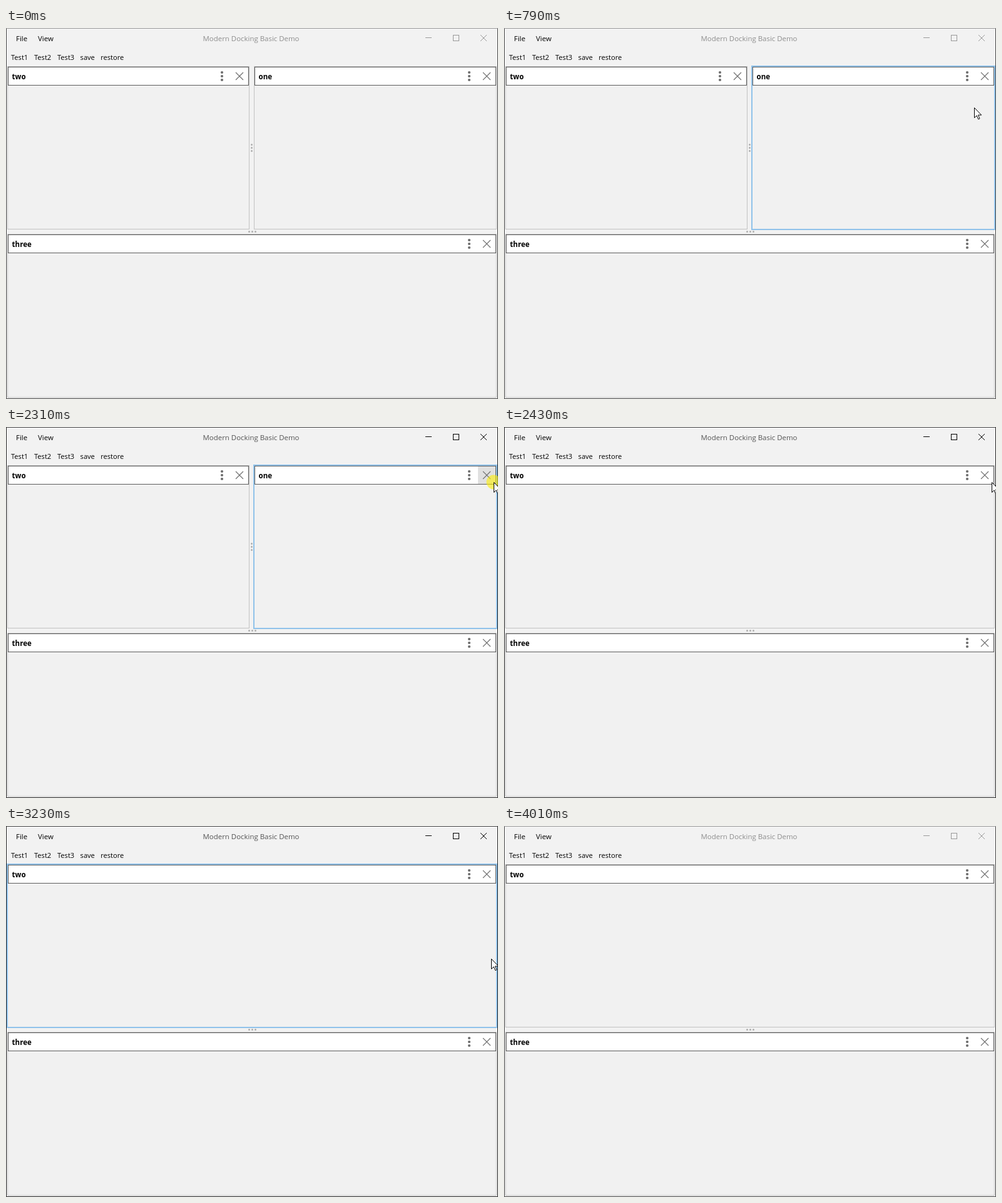
An HTML page for the animation above (4.11 s loop, 786 px wide and 593 px high).

```html
<!DOCTYPE html>
<html lang="en">
<head>
<meta charset="utf-8">
<title>Docking demo</title>
<style>
  html, body { margin: 0; width: 100%; height: 100%; overflow: hidden; background: #f2f2f2; }
  svg { display: block; width: 786px; height: 593px; }
  text { font-family: "Open Sans", "Noto Sans", sans-serif; font-size: 11.45px; }
  .tool { font-size: 11.1px; }
  .name { font-size: 11.5px; font-weight: 700; }
</style>
</head>
<body>
<svg viewBox="0 0 786 593" xmlns="http://www.w3.org/2000/svg">
  <rect width="786" height="593" fill="#f2f2f2"/>
  <g id="menu"></g>
  <text id="title" x="314.5" y="21">Modern Docking Basic Demo</text>
  <g id="controls" fill="none">
    <path d="M670 15.5h10M714.5 11.5h9v9h-9z" shape-rendering="crispEdges"/>
    <path d="M758 11l10 10M768 11l-10 10"/>
  </g>
  <g id="panels"></g>
  <path id="frame" d="M.5 0V592.5H785.5V0" fill="none"/>
  <path id="topEdge" d="M0 .5H786"/>
  <circle id="press" cx="779" cy="88" r="11.5" fill="#fff000" fill-opacity=".58"/>
  <path id="cursor" d="M.5 .5V16.5L4.2 13L6.8 18.8L9 17.8L6.5 12.1H11.7Z" fill="#fff" stroke="#000"/>
</svg>
<script>
const LOOP = 4110;
const PRESS = 2310, RELEASE = 2430, LEAVE = 3730, BLUR = 3880, CLEAR = 4010;
const $ = id => document.getElementById(id);

// Pointer strokes: start, end, sampling step, then [time, x, y] points.
const strokes = [
  { from: 250, to: 770, step: 26, points: [
    [250, 652, 578], [300, 682, 450], [340, 702, 364], [380, 718, 291],
    [450, 734, 212], [540, 744, 160], [640, 748, 136], [770, 750, 128]] },
  { from: 790, to: 1240, step: 30, points: [
    [790, 751, 127], [920, 760, 112], [1080, 772, 97], [1240, 779, 88]] },
  { from: 3080, to: 3605, step: 26.25, points: [
    [3080, 779, 90], [3150, 777, 132], [3240, 774, 250], [3340, 772, 400],
    [3420, 770, 496], [3500, 769, 558], [3590, 767, 580], [3605, 767, 580]] },
  { from: 3610, to: 3730, step: 24, points: [
    [3610, 767, 582], [3730, 766, 592]] }
];

function pointer(t) {
  if (t < strokes[0].from || t >= LEAVE) return null;
  const s = strokes.filter(s => t >= s.from).pop();
  const time = Math.min(s.to, s.from + Math.floor((t - s.from) / s.step) * s.step);
  const i = Math.max(1, s.points.findIndex(p => p[0] >= time));
  const a = s.points[i - 1], b = s.points[i];
  const k = (time - a[0]) / (b[0] - a[0]);
  return { x: Math.round(a[1] + (b[1] - a[1]) * k), y: Math.round(a[2] + (b[2] - a[2]) * k) };
}

const box = (x, y, w, h, fill, stroke = "none", width = 1) =>
  `<rect x="${x}" y="${y}" width="${w}" height="${h}" fill="${fill}" stroke="${stroke}" stroke-width="${width}"/>`;

const dots = (x, y, dx, dy, r, fill) => [-1, 0, 1].map(n =>
  `<circle cx="${x + n * dx}" cy="${y + n * dy}" r="${r}" fill="${fill}"/>`).join("");

function panel(name, x, y, right, bottom, lit, button) {
  const w = right - x, cy = y + 16, cx = right - 16;
  return box(x + .5, y + .5, w - 1, bottom - y - 1, "#f1f1f1", "#c2c2c2")
    + box(x + 1.5, y + 1.5, w - 3, 29, "#fff", "#5c5c5c")
    + (button ? box(right - 30, y + 2, 28, 28, button) : "")
    + `<text class="name" x="${x + 7.6}" y="${y + 21}">${name}</text>`
    + dots(right - 44, cy, 0, 6, 2.1, "#6e6e6e")
    + `<path d="M${cx - 6} ${cy - 6}l12 12m0 -12l-12 12" stroke="#6e6e6e" stroke-width="1.15"/>`
    + (lit ? box(x, y, w, bottom - y, "none", "#90c2ea", 2) : "");
}

function layout(t, p) {
  const split = t < RELEASE;
  const inLower = p ? p.y >= 326 : t >= LEAVE && t < CLEAR;
  const waiting = t >= RELEASE && t < 3080;
  const inUpper = p && !inLower && !waiting;
  const over = inUpper && p.y < 92 && p.x >= 754;
  const button = over ? (t >= PRESS && split ? "#e0e0e0" : "#f4f4f4") : "";
  const upper = split
    ? panel("two", 2, 61, 389, 322) + dots(392.5, 191.5, 0, 5, 1.5, "#afafaf")
      + panel("one", 396, 61, 784, 322, inUpper, button)
    : panel("two", 2, 61, 784, 322, inUpper, button);
  return upper + dots(393.5, 325.5, 5, 0, 1.5, "#afafaf")
    + panel("three", 2, 329, 784, 591, inLower);
}

let shown = "";
function draw(t) {
  const p = pointer(t);
  const active = t >= PRESS && t < BLUR;
  const html = layout(t, p);
  if (html !== shown) $("panels").innerHTML = shown = html;
  $("title").setAttribute("fill", active ? "#555" : "#8e8e8e");
  $("controls").setAttribute("stroke", active ? "#000" : "#999");
  $("frame").setAttribute("stroke", active ? "#222" : "#444");
  $("topEdge").setAttribute("stroke", active ? "#444" : "#999");
  $("press").style.display = t >= PRESS && t < RELEASE ? "" : "none";
  $("cursor").style.display = p ? "" : "none";
  if (p) $("cursor").setAttribute("transform", `translate(${p.x} ${p.y})`);
}

const label = (x, y, text, kind) => `<text class="${kind}" x="${x}" y="${y}">${text}</text>`;
$("menu").innerHTML = label(16, 21, "File", "") + label(51, 21, "View", "")
  + [[8, "Test1"], [45, "Test2"], [82, "Test3"], [118.6, "save"], [151.3, "restore"]]
    .map(([x, text]) => label(x, 51, text, "tool")).join("");

const start = performance.now();
function tick() {
  draw((performance.now() - start) % LOOP);
  requestAnimationFrame(tick);
}
tick();
</script>
</body>
</html>
```
